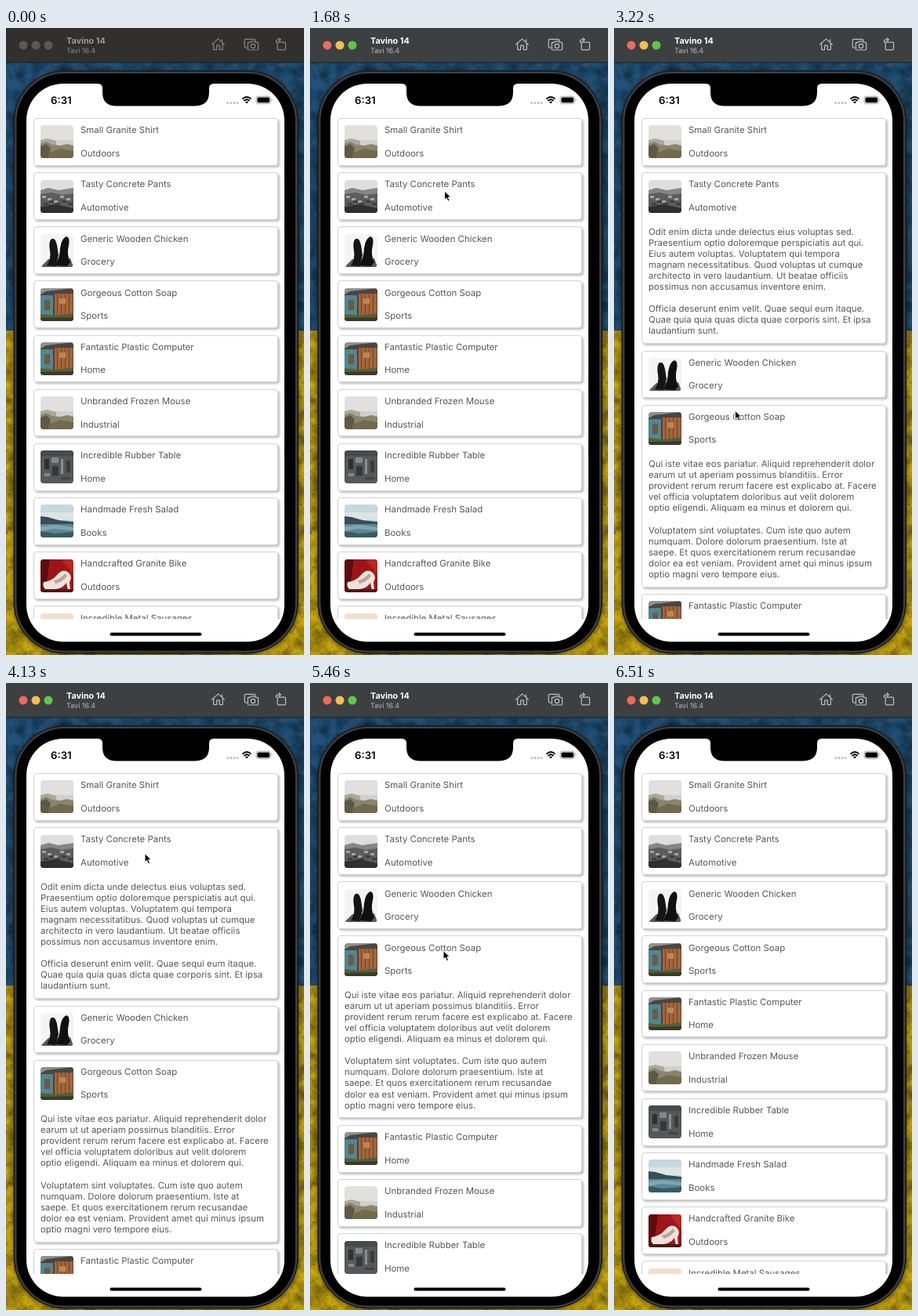
Animation of 380x800 px, one loop 6.58 s. Source, as an HTML page:

```html
<!DOCTYPE html>
<html lang="en">
<head>
<meta charset="utf-8">
<title>Expandable product list</title>
<style>
html, body { margin: 0; width: 100%; height: 100%; overflow: hidden; background: #111; }
body {
  position: relative; font: 11.45px/14.08px Inter, "Open Sans", sans-serif;
  color: #585858; text-rendering: geometricPrecision;
}
svg { display: block; }
#stage, #pointer { position: absolute; left: 0; top: 0; }
#list { position: absolute; left: 26px; top: 107px; width: 329px; height: 647px; overflow: hidden; }
.card {
  position: absolute; left: 9.3px; width: 311.7px; box-sizing: border-box; overflow: hidden;
  background: #fff; border: 1px solid #d2d2d2; border-radius: 4px; box-shadow: 2px 2px 3px #00000042;
}
.card > * { position: absolute; white-space: pre; }
.card svg { left: 7.8px; top: 8.4px; border-radius: 4px; }
.name { left: 58.7px; top: 7.3px; }
.kind { left: 58.7px; top: 36.8px; }
.more { left: 7.7px; top: 67.4px; }
</style>
</head>
<body>
<svg id="stage" width="380" height="800" font-family="Inter, sans-serif">
  <defs>
    <filter id="stain" x="0" y="0" width="1" height="1" color-interpolation-filters="sRGB">
      <feTurbulence type="fractalNoise" baseFrequency=".06" numOctaves="5" seed="4"/>
      <feColorMatrix values="0 0 0 0 0  0 0 0 0 .03  0 0 0 0 .04  .9 0 0 0 -.28"/>
    </filter>
    <filter id="specks" x="0" y="0" width="1" height="1" color-interpolation-filters="sRGB">
      <feTurbulence type="fractalNoise" baseFrequency=".3" numOctaves="2" seed="9"/>
      <feColorMatrix values="0 0 0 0 0  0 0 0 0 .02  0 0 0 0 .03  4 0 0 0 -2.6"/>
    </filter>
    <filter id="soft" x="-10%" y="-10%" width="120%" height="120%"><feGaussianBlur stdDeviation="5"/></filter>
  </defs>
  <rect width="380" height="386" fill="#21527a"/>
  <rect y="386" width="380" height="414" fill="#cba90f"/>
  <rect width="380" height="800" filter="url(#stain)"/>
  <rect width="380" height="800" filter="url(#specks)" opacity=".5"/>

  <rect x="10" y="57" width="363" height="743" rx="66" opacity=".5" filter="url(#soft)"/>
  <g fill="#272727">
    <rect x="8.5" y="170" width="3" height="24" rx="1"/>
    <rect x="8.5" y="219" width="3" height="44" rx="1"/>
    <rect x="8.5" y="275" width="3" height="44" rx="1"/>
    <rect x="371.5" y="246" width="3" height="72" rx="1"/>
  </g>
  <rect x="10" y="54.5" width="362.5" height="743.5" rx="65" fill="#262627" stroke="#181818"/>
  <rect x="12.5" y="57" width="357.5" height="738.5" rx="62" fill="#000" stroke="#414142" stroke-width="2"/>
  <rect x="26" y="71" width="329" height="712" rx="47" fill="#fff"/>
  <path d="M117 70.5V71Q123 71 123 77V82Q123 99.5 141 99.5H241Q259 99.5 259 82V77Q259 71 265 71V70.5Z"/>
  <rect x="132.5" y="771.5" width="117" height="4" rx="2"/>

  <text x="57" y="96.5" font-size="13.2" font-weight="600">6:31</text>
  <g fill="#b9b9b9">
    <circle cx="282.7" cy="95.6" r="1.4"/><circle cx="286.8" cy="95.6" r="1.4"/>
    <circle cx="290.9" cy="95.6" r="1.4"/><circle cx="295" cy="95.6" r="1.4"/>
  </g>
  <g fill="none" stroke="#000" stroke-width="1.8">
    <path d="M301.4 90.7Q307 85.3 312.6 90.7M303.4 93Q307 89.6 310.6 93"/>
    <path d="M305 94.3Q307 92.5 309 94.3L307 96.5Z" fill="#000" stroke="none"/>
  </g>
  <rect x="319" y="87.2" width="18.6" height="9.4" rx="2.8" fill="none" stroke="#999" stroke-width=".9"/>
  <rect x="320.4" y="88.6" width="15.8" height="6.6" rx="1.6"/>
  <path d="M338.8 90.3Q340.6 91.9 338.8 93.5Z" fill="#999"/>

  <rect width="380" height="44.5" fill="#1b1d1d"/>
  <rect id="bar" width="380" height="43.5"/>
  <circle class="light" cx="22" cy="22" r="5.5"/>
  <circle class="light" cx="38" cy="22" r="5.5"/>
  <circle class="light" cx="54" cy="22" r="5.5"/>
  <text id="title" x="77" y="20.3" font-size="10.8" font-weight="700">Tavino 14</text>
  <text id="system" x="77" y="32.3" font-size="9">Tavi 16.4</text>
  <g id="tools" fill="none" stroke-width="1.2" stroke-linejoin="round" stroke-linecap="round" transform="translate(0 -.4)">
    <path d="M262.5 21.5L270.5 14.3L278.5 21.5M264.7 20V28H268.7V22.5H272.3V28H276.3V20M275.5 18V15.2"/>
    <path d="M307 25.5H305.5Q304.3 25.5 304.3 24.3V16Q304.3 14.8 305.5 14.8H316.5Q317.7 14.8 317.7 16V17"/>
    <path d="M308.5 18.8H311.6L312.8 17.3H317.2L318.4 18.8H320.7Q321.6 18.8 321.6 19.7V27.5Q321.6 28.4 320.7 28.4H309.3Q308.4 28.4 308.4 27.5Z"/>
    <circle cx="315" cy="23.5" r="2.7"/>
    <path d="M346.2 18.6H355.5Q356.5 18.6 356.5 19.6V27.2Q356.5 28.2 355.5 28.2H347.2Q346.2 28.2 346.2 27.2ZM344.5 19V17.5Q344.5 15.2 346.8 15.2H350M348.2 13L350.3 15.2L348.2 17.3"/>
  </g>
</svg>
<div id="list"></div>
<svg id="pointer" width="14" height="18">
  <path d="M1.5 1V12.2L4.1 9.8L6 14.1L8.1 13.2L6.2 9H9.7Z" stroke="#fff" stroke-width="1"/>
</svg>
<script>
const LOOP = 6580, STEP = 70, TOP = 8, HEIGHT = 60.7, PITCH = 69.15;
const $ = id => document.getElementById(id);
const box = (x, y, w, h, fill) => `<rect x="${x}" y="${y}" width="${w}" height="${h}" fill="${fill}"/>`;
const shape = (d, fill) => `<path d="${d}" fill="${fill}"/>`;
const bg = fill => box(0, 0, 42, 42, fill);

// Thumbnails, drawn on a 42 x 42 field
const art = {
  coast: bg('#e2e0de') + box(0, 19, 42, 12, '#cfd0cd') +
    shape('M0 19L9 17L20 20V26H0Z', '#a9a89c') +
    shape('M0 24L8 21L15 25L25 26L34 24L42 26V42H0Z', '#8b8468') +
    shape('M0 27L7 24L13 29L10 42H0Z', '#5f5a43') +
    shape('M12 35L25 30L42 33V42H10Z', '#716a4d'),
  city: bg('#dedede') + shape('M0 13L10 10L23 13L42 10V22H0Z', '#858585') +
    shape('M0 18L14 16L27 19L42 17V42H0Z', '#5c5c5c') +
    [2, 9, 17, 25, 33].map((x, i) => box(x, 20 + i % 3 * 3, 5, 3, '#a4a4a4') + box(x + 2, 29 - i % 2 * 3, 6, 3, '#3e3e3e')).join('') +
    shape('M0 34L18 31L42 36V42H0Z', '#303030'),
  feet: bg('#f4f4f4') + shape('M0 42L10 32L38 31L42 42Z', '#5a5a5a') +
    shape('M8 40Q14 31 12 21Q10 9 14 6Q19 4 21 14L23 27L19 41Z', '#151515') +
    shape('M19 40Q25 28 25 18Q27 5 33 3Q38 4 36 14Q33 26 38 36L34 41Z', '#101010'),
  hut: bg('#8d9290') + shape('M0 8L7 4L42 0V10H0Z', '#4c4540') +
    box(0, 9, 18, 26, '#4f8792') + box(18, 7, 24, 28, '#a4653b') +
    [21, 26, 31, 36, 41].map(x => box(x, 7, 1, 28, '#734631')).join('') +
    box(5, 15, 7, 13, '#6d5a44') + box(16, 8, 2, 27, '#5c3c2c') +
    box(24, 13, 8, 7, '#bd8654') + shape('M0 33L18 35L42 32V42H0Z', '#565f35') + shape('M0 38L42 37V42H0Z', '#383c27'),
  desk: bg('#55575a') + box(0, 0, 42, 7, '#48494c') + box(5, 11, 6, 13, '#2e3033') +
    box(14, 9, 9, 7, '#85868a') + box(15, 20, 8, 12, '#35373a') + box(26, 11, 3, 19, '#8d8c88') +
    box(33, 13, 5, 15, '#383a3d') + box(5, 29, 7, 4, '#85878a') + box(26, 34, 12, 3, '#404245'),
  lake: bg('#c4d8df') + box(0, 10, 42, 10, '#dce4e4') + shape('M0 15L9 16L23 20L42 22V28H0Z', '#344f5a') +
    box(0, 25, 42, 17, '#5e8794') + shape('M0 28L18 26L42 29V33L16 31L0 34Z', '#82a6b0') + shape('M0 34L18 37L42 35V42H0Z', '#365c67'),
  shoe: bg('#9f1517') + shape('M0 0H12L6 42H0Z', '#5f0b0f') + shape('M27 0H42V20Z', '#bd2521') +
    shape('M4 29Q14 28 21 20Q29 11 36 17Q41 22 37 29L38 40H35L33 30Q27 38 18 38H6Q2 34 4 29Z', '#eee4dc') +
    shape('M17 27Q25 25 31 18L34 21Q28 29 19 31Z', '#b9a69d') + box(0, 38, 42, 4, '#4d1614'),
  dusk: bg('#f1dfce') + box(0, 12, 42, 30, '#d5a68b')
};

const items = [
  ['coast', 'Small Granite Shirt', 'Outdoors'],
  ['city', 'Tasty Concrete Pants', 'Automotive', `Odit enim dicta unde delectus eius voluptas sed.
Praesentium optio doloremque perspiciatis aut qui.
Eius autem voluptas. Voluptatem qui tempora
magnam necessitatibus. Quod voluptas ut cumque
architecto in vero laudantium. Ut beatae officiis
possimus non accusamus inventore enim.

Officia deserunt enim velit. Quae sequi eum itaque.
Quae quia quia quas dicta quae corporis sint. Et ipsa
laudantium sunt.`],
  ['feet', 'Generic Wooden Chicken', 'Grocery'],
  ['hut', 'Gorgeous Cotton Soap', 'Sports', `Qui iste vitae eos pariatur. Aliquid reprehenderit dolor
earum ut ut aperiam possimus blanditiis. Error
provident rerum rerum facere est explicabo at. Facere
vel officia voluptatem doloribus aut velit dolorem
optio eligendi. Aliquam ea minus et dolorem qui.

Voluptatem sint voluptates. Cum iste quo autem
numquam. Dolore dolorum praesentium. Iste at
saepe. Et quos exercitationem rerum recusandae
dolor ea est veniam. Provident amet qui minus ipsum
optio magni vero tempore eius.`],
  ['hut', 'Fantastic Plastic Computer', 'Home'],
  ['coast', 'Unbranded Frozen Mouse', 'Industrial'],
  ['desk', 'Incredible Rubber Table', 'Home'],
  ['lake', 'Handmade Fresh Salad', 'Books'],
  ['shoe', 'Handcrafted Granite Bike', 'Outdoors'],
  ['dusk', 'Incredible Metal Sausages', 'Home']
];

$('list').innerHTML = items.map(([pic, name, kind, more = '']) => `<div class="card">
  <svg width="42" height="42">${art[pic]}</svg><div class="name">${name}</div>
  <div class="kind">${kind}</div><div class="more">${more}</div></div>`).join('');
const cards = [...document.querySelectorAll('.card')];
const lights = [...document.querySelectorAll('.light')];

// Expansion by card index: full extra height, opening start, closing start
const folds = { 1: [158.2, 1710, 4312], 3: [172.3, 2550, 5540] };
const FOLD_TIME = 300;

// Pointer stops: time, x, y
const stops = [
  [500, 384, 330], [1350, 171, 208], [1960, 171, 208], [2420, 151, 522], [3010, 151, 522],
  [3900, 176.5, 217.5], [4750, 176.5, 217.5], [5300, 169.5, 341.5], [5950, 169.5, 341.5], [6420, 384, 430]
];

const clamp = v => Math.min(1, Math.max(0, v));
const ease = p => p < .5 ? 2 * p * p : 1 - 2 * (1 - p) ** 2;
const ramp = (t, start, span) => ease(clamp((t - start) / span));
const mix = (a, b, p) => a + (b - a) * p;
const blend = (a, b, p) => `rgb(${a.map((v, i) => Math.round(mix(v, b[i], p)))})`;

function drawBar(p) {
  $('bar').setAttribute('fill', blend([50, 48, 45], [60, 64, 64], p));
  const on = [[237, 106, 94], [245, 191, 79], [97, 197, 84]];
  lights.forEach((el, i) => el.setAttribute('fill', blend([91, 88, 85], on[i], p)));
  $('title').setAttribute('fill', blend([157, 155, 153], [255, 255, 255], p));
  $('system').setAttribute('fill', blend([140, 138, 136], [185, 188, 188], p));
  $('tools').setAttribute('stroke', blend([135, 133, 131], [188, 191, 191], p));
}

function drawCards(t) {
  let shift = 0;
  cards.forEach((card, i) => {
    const [extra, open, close] = folds[i] || [0, 0, 0];
    const grow = extra * (ramp(t, open, FOLD_TIME) - ramp(t, close, FOLD_TIME));
    card.style.top = TOP + i * PITCH + shift + 'px';
    card.style.height = HEIGHT + grow + 'px';
    shift += grow;
  });
}

function drawPointer(t) {
  let [, x, y] = stops[0];
  for (let i = 1; i < stops.length; i++) {
    const [t0, x0, y0] = stops[i - 1], [t1, x1, y1] = stops[i];
    if (t < t0) break;
    const p = ramp(t, t0, t1 - t0);
    x = mix(x0, x1, p);
    y = mix(y0, y1, p);
  }
  $('pointer').style.transform = `translate(${x - 1}px, ${y - 1}px)`;
}

const begin = performance.now();
function frame() {
  const t = Math.floor((performance.now() - begin) % LOOP / STEP) * STEP;
  drawBar(clamp(t / 140));
  drawCards(t);
  drawPointer(t);
  requestAnimationFrame(frame);
}
frame();
</script>
</body>
</html>
```
